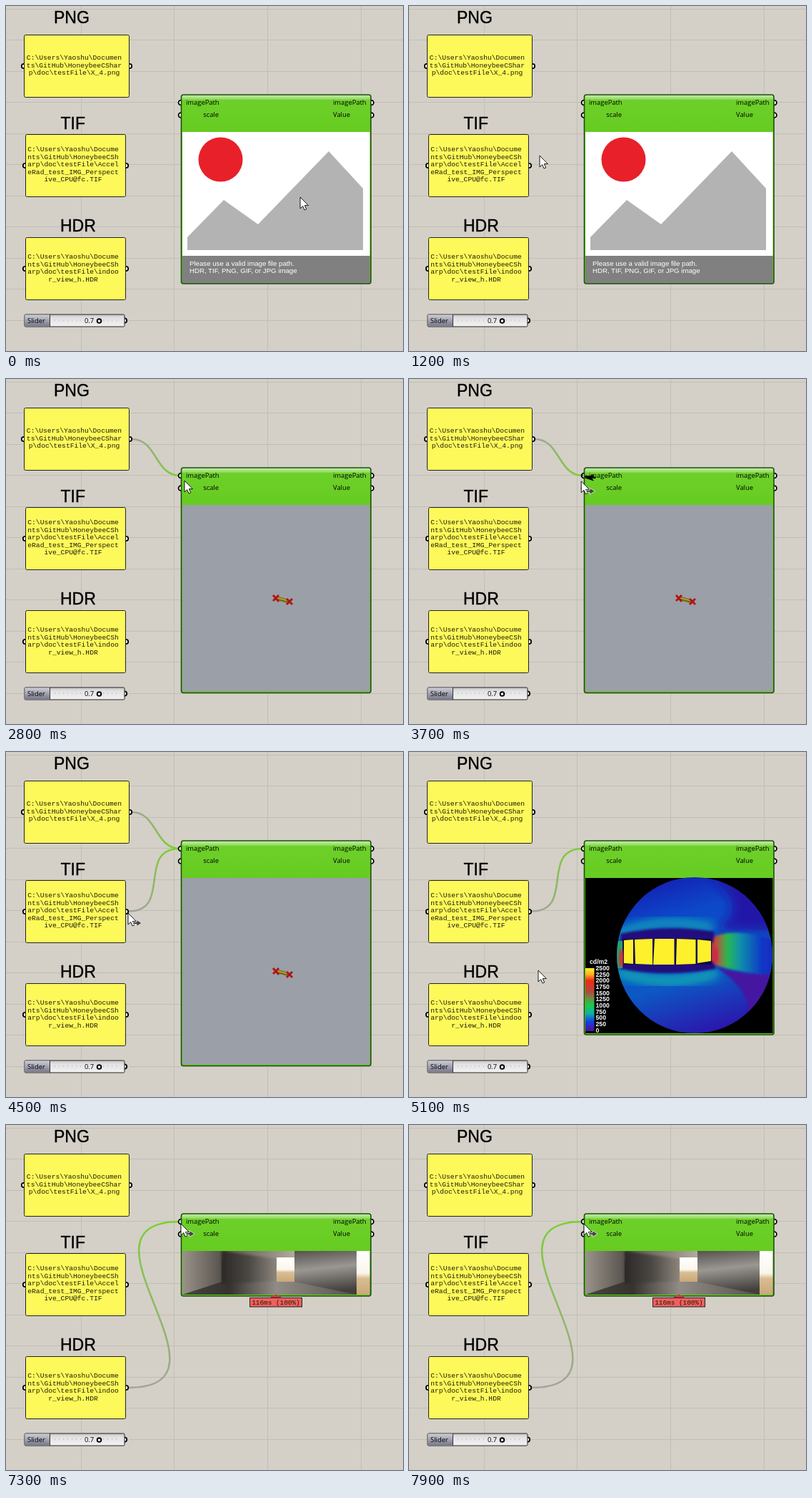
These frames come from a looping animation (556x482 px, 8000 ms). An HTML page:

```html
<!DOCTYPE html>
<html lang="en">
<head>
<meta charset="utf-8">
<title>Image viewer wiring</title>
<style>
  html, body { margin: 0; width: 100%; height: 100%; overflow: hidden; background: #d4d0c8; }
  svg { display: block; }
  text { white-space: pre; }
  .title { font: 23px "Liberation Sans", Arial, sans-serif; stroke: #000; stroke-width: .4; }
  .mono { font: 9.67px "Liberation Mono", "Courier New", monospace; fill: #1c1c08; text-anchor: middle; }
  .ui { font: 9.4px "Open Sans", "Noto Sans", sans-serif; }
  .note { font: 9.66px "Liberation Sans", Arial, sans-serif; fill: #fff; }
  .scale { font: bold 8.7px "Liberation Sans", Arial, sans-serif; fill: #fff; }
  .port { fill: #fff; stroke: #000; stroke-width: 1.8; }
  .wire { fill: none; stroke-width: 2.6; }
</style>
</head>
<body>
<svg width="556" height="482" viewBox="0 0 556 482">
  <defs>
    <linearGradient id="body" gradientUnits="userSpaceOnUse" x1="0" y1="124" x2="0" y2="176">
      <stop offset="0" stop-color="#c9eeb0"/><stop offset=".12" stop-color="#92dc60"/>
      <stop offset=".14" stop-color="#6dd02a"/><stop offset="1" stop-color="#66cc20"/>
    </linearGradient>
    <linearGradient id="knob" x2="0" y2="1">
      <stop offset="0" stop-color="#cdcdd6"/><stop offset="1" stop-color="#77778a"/>
    </linearGradient>
    <linearGradient id="track" x2="0" y2="1">
      <stop offset="0" stop-color="#c6c6c6"/><stop offset=".3" stop-color="#e2e2e2"/><stop offset="1" stop-color="#f2f2f2"/>
    </linearGradient>
    <linearGradient id="heat" x2="0" y2="1">
      <stop offset="0" stop-color="#fff02c"/><stop offset=".1" stop-color="#ffb020"/>
      <stop offset=".2" stop-color="#f02818"/><stop offset=".38" stop-color="#b04a40"/>
      <stop offset=".5" stop-color="#5c9a48"/><stop offset=".6" stop-color="#18cc50"/>
      <stop offset=".72" stop-color="#10b0a8"/><stop offset=".85" stop-color="#1440e0"/>
      <stop offset="1" stop-color="#5a0c9c"/>
    </linearGradient>
    <linearGradient id="dome" x1=".3" x2=".6" y2="1">
      <stop offset="0" stop-color="#1420b4"/><stop offset=".25" stop-color="#0c48c8"/>
      <stop offset=".65" stop-color="#0c58c4"/><stop offset="1" stop-color="#2c14ac"/>
    </linearGradient>
    <linearGradient id="glow">
      <stop offset="0" stop-color="#d82838"/><stop offset=".1" stop-color="#a86040"/>
      <stop offset=".25" stop-color="#28b850"/><stop offset=".45" stop-color="#1090a8"/>
      <stop offset=".8" stop-color="#1038c8"/><stop offset="1" stop-color="#1828b8"/>
    </linearGradient>
    <linearGradient id="wallL"><stop offset="0" stop-color="#9a938a"/><stop offset="1" stop-color="#58534d"/></linearGradient>
    <linearGradient id="wallB"><stop offset="0" stop-color="#2b2826"/><stop offset=".5" stop-color="#4c4844"/><stop offset="1" stop-color="#8c857c"/></linearGradient>
    <linearGradient id="roof"><stop offset="0" stop-color="#4e4a45"/><stop offset="1" stop-color="#b3aa9d"/></linearGradient>
    <linearGradient id="slab" x2=".15" y2="1"><stop offset="0" stop-color="#56524e"/><stop offset=".45" stop-color="#9a9691"/><stop offset="1" stop-color="#423f3c"/></linearGradient>
    <linearGradient id="floor"><stop offset="0" stop-color="#4a4642"/><stop offset=".25" stop-color="#35322f"/><stop offset=".5" stop-color="#918c85"/><stop offset="1" stop-color="#4c4844"/></linearGradient>
    <linearGradient id="sky" x2="0" y2="1">
      <stop offset="0" stop-color="#fff"/><stop offset=".5" stop-color="#fbf6ec"/>
      <stop offset=".62" stop-color="#d9bd92"/><stop offset="1" stop-color="#c8a878"/>
    </linearGradient>
    <filter id="soft" x="-30%" y="-50%" width="160%" height="200%"><feGaussianBlur stdDeviation="7"/></filter>
    <filter id="haze" x="-30%" y="-30%" width="160%" height="160%"><feGaussianBlur stdDeviation="1.5"/></filter>
    <clipPath id="lens"><circle cx="400" cy="284" r="109"/></clipPath>
    <clipPath id="strip"><rect x="247" y="176" width="262.5" height="61"/></clipPath>
  </defs>

  <g id="grid" stroke="#c1beb5"></g>
  <g id="wires"></g>
  <g id="panels"></g>

  <g id="slider">
    <circle class="port" cx="166" cy="439.5" r="3.2"/>
    <rect x="26" y="431" width="140" height="17" rx="1.5" fill="url(#track)" stroke="#222"/>
    <rect x="26.5" y="431.5" width="34.5" height="16" fill="url(#knob)"/>
    <path d="M61.5 431V448" stroke="#333"/>
    <path d="M68 439H106M136 439H160" stroke="#c4c4c4" stroke-width="2" stroke-dasharray="1 5"/>
    <text class="ui" x="30" y="443">Slider</text>
    <text class="ui" x="110" y="443">0.7</text>
    <circle cx="130.5" cy="440" r="2.8" fill="#fff" stroke="#000" stroke-width="1.9"/>
  </g>

  <g id="viewer">
    <g id="ports"></g>
    <rect id="shell" x="245.5" y="124" width="265.5" rx="3" fill="url(#body)" stroke="#1d4f0c" stroke-width="1.6"/>
    <text class="ui" x="252" y="138">imagePath</text>
    <text class="ui" x="298" y="155" text-anchor="end">scale</text>
    <text class="ui" x="458" y="138">imagePath</text>
    <text class="ui" x="458" y="155">Value</text>

    <g id="empty">
      <rect x="247" y="176" width="262.5" height="173" fill="#fff"/>
      <circle cx="300.5" cy="214.5" r="31" fill="#e8202a"/>
      <path d="M254 341V323L305 271L353 305L452 203L500 255V341Z" fill="#b3b3b3"/>
      <rect x="247" y="349" width="262.5" height="38" fill="#808080"/>
      <text class="note" x="257" y="362.5">Please use a valid image file path.</text>
      <text class="note" x="257" y="373">HDR, TIF, PNG, GIF, or JPG image</text>
    </g>

    <g id="png">
      <rect x="247" y="176" width="262.5" height="260.5" fill="#9b9fa8"/>
      <path d="M378 306L397 311" stroke="#6f6a1c" stroke-width="5"/>
      <path d="M380 306L396 310" stroke="#c8a830" stroke-width="1.5"/>
      <path d="M374 302L382 311M382 302L374 310M393 307L401 315M401 307L393 315" stroke="#b01414" stroke-width="2.8"/>
    </g>

    <g id="tif">
      <rect x="247" y="176" width="262.5" height="217" fill="#000"/>
      <g clip-path="url(#lens)">
        <rect x="290" y="174" width="220" height="220" fill="url(#dome)"/>
        <path d="M420 170L515 170V250L430 248Q480 220 420 170Z" fill="#2014a8" filter="url(#soft)"/>
        <path d="M288 256Q350 228 426 246" fill="none" stroke="#10a0b8" stroke-width="13" filter="url(#soft)"/>
        <path d="M290 306Q360 332 432 308" fill="none" stroke="#10a8b4" stroke-width="15" filter="url(#soft)"/>
        <path d="M424 260Q450 244 512 262V312Q460 308 424 296Z" fill="url(#glow)" filter="url(#haze)"/>
        <path d="M428 299Q460 311 512 311V360L470 380Q490 340 428 299Z" fill="#4412a0" filter="url(#haze)"/>
        <path d="M296 254Q360 240 428 251L426 266H297ZM296 292H426L430 303Q360 315 296 303Z" fill="#20107c" filter="url(#haze)"/>
        <rect x="299" y="261" width="125" height="36" fill="#120a48"/>
        <path d="M290 264H299V302H290Z" fill="#28a068"/>
        <ellipse cx="297" cy="288" rx="3" ry="13" fill="#d03438" filter="url(#haze)"/>
        <path d="M301 263L314 262V296L301 295ZM316 262L341 261V297L317 296ZM344 261H371.500V297H342ZM375 261L401.500 262V296L374 297ZM404 262L423 264V292L404 295Z" fill="#fff02c"/>
        <ellipse cx="429" cy="284" rx="4" ry="12" fill="#d02c44" filter="url(#haze)"/>
      </g>
      <text class="scale" x="253" y="296">cd/m2</text>
      <rect x="247" y="302" width="12.500" height="88" fill="url(#heat)"/>
      <g id="ticks"></g>
    </g>

    <g id="hdr">
      <g clip-path="url(#strip)">
        <rect x="247" y="176" width="263" height="62" fill="url(#floor)"/>
        <path d="M300 176H404V186L379 188L302 190Z" fill="url(#roof)"/>
        <path d="M247 176H302V219L247 237Z" fill="url(#wallL)"/>
        <path d="M302 176L379 187V218L302 222Z" fill="url(#wallB)" filter="url(#haze)"/>
        <rect x="379" y="185" width="26" height="34" fill="url(#sky)"/>
        <path d="M404 176H491V237L404 219Z" fill="url(#slab)"/>
        <rect x="491" y="176" width="19" height="62" fill="url(#sky)"/>
      </g>
      <path d="M369 241.500L378 236.500L387 241.500Z" fill="#c83c40"/>
      <rect x="341.500" y="241.500" width="73" height="12.500" fill="#f0605f" stroke="#222"/>
      <text class="mono" x="378" y="251" style="font-size:9.4px">116ms (100%)</text>
    </g>
  </g>

  <g id="drag">
    <path id="dash" fill="none" stroke="#000" stroke-width="2.6" stroke-dasharray="6 3"/>
    <path id="head" d="M0 0L-14 -4.500L-11 0L-14 4.500Z"/>
  </g>
  <g id="cursor">
    <path d="M0 0V16L3.700 12.600L6.100 18L8.700 16.900L6.300 11.600H11.300Z" fill="#fff" stroke="#000" stroke-width=".9"/>
    <path id="badge" d="M7 12.500H12V9.500L19 14L12 18.500V15.500H7Z" fill="#444" stroke="#eee" stroke-width=".8"/>
  </g>
</svg>

<script>
const LOOP = 8000, STEP = 100;
const $ = id => document.getElementById(id);

function add(parent, tag, attrs, text = "") {
  const el = document.createElementNS("http://www.w3.org/2000/svg", tag);
  for (const key in attrs) el.setAttribute(key, attrs[key]);
  el.textContent = text;
  parent.append(el);
  return el;
}

// Background grid
for (let i = 0; i < 4; i++) {
  const x = Math.round(104.5 + i * 130.7) + .5;
  add($("grid"), "path", { d: `M${x} 0V482` });
}
for (let i = 0; i < 11; i++) {
  const y = Math.round(3.5 + i * 43.55) + .5;
  add($("grid"), "path", { d: `M0 ${y}H556` });
}

// Text panels
const panels = [
  { title: "PNG", tx: 67, ty: 24, x: 25.5, y: 40.5, w: 147, cx: 95.5, base: 75,
    lines: ["C:\\Users\\Yaoshu\\Documen", "ts\\GitHub\\HoneybeeCShar", "p\\doc\\testFile\\X_4.png"] },
  { title: "TIF", tx: 76.5, ty: 172, x: 27.5, y: 179.5, w: 140, cx: 94, base: 203,
    lines: ["C:\\Users\\Yaoshu\\Docume", "nts\\GitHub\\HoneybeeCSh", "arp\\doc\\testFile\\Accel",
      "eRad_test_IMG_Perspect", "ive_CPU@fc.TIF"] },
  { title: "HDR", tx: 76, ty: 314.5, x: 27.5, y: 323.5, w: 140, cx: 94, base: 353,
    lines: ["C:\\Users\\Yaoshu\\Docume", "nts\\GitHub\\HoneybeeCSh", "arp\\doc\\testFile\\indoo", "r_view_h.HDR"] }
];
for (const p of panels) {
  const g = $("panels"), cy = p.y + 43.5;
  add(g, "text", { class: "title", x: p.tx, y: p.ty }, p.title);
  for (const cx of [p.x - .5, p.x + p.w + .5]) add(g, "circle", { class: "port", cx, cy, r: 3.2 });
  add(g, "rect", { x: p.x, y: p.y, width: p.w, height: 87, rx: 2, fill: "#fef95a", stroke: "#222" });
  p.lines.forEach((line, i) => add(g, "text", { class: "mono", x: p.cx, y: p.base + i * 10.6 }, line));
}

for (const cx of [245, 511.5])
  for (const cy of [135, 152.5]) add($("ports"), "circle", { class: "port", cx, cy, r: 3.4 });

for (let i = 0; i <= 10; i++)
  add($("ticks"), "text", { class: "scale", x: 261.5, y: 305 + i * 8.65 }, 2500 - i * 250);

// Wires leave and arrive horizontally
const inlet = [244, 135];
function curve([x0, y0], [x1, y1]) {
  const d = Math.max(.71 * Math.abs(y1 - y0), Math.abs(x1 - x0) / 2);
  return `M${x0} ${y0}C${x0 + d} ${y0} ${x1 - d} ${y1} ${x1} ${y1}`;
}

const links = [
  { from: [176, 84], on: 2600, off: 4700 },
  { from: [171.5, 222.5], on: 4400, off: 7100 },
  { from: [171.5, 367], on: 6700, off: LOOP }
];
links.forEach((link, i) => {
  const [x1, y1] = link.from, [x2, y2] = inlet;
  const grad = add($("wires"), "linearGradient", { id: "tint" + i, gradientUnits: "userSpaceOnUse", x1, y1, x2, y2 });
  add(grad, "stop", { offset: 0, "stop-color": "#a5a29c" });
  add(grad, "stop", { offset: 1, "stop-color": "#78d228" });
  link.el = add($("wires"), "path", { class: "wire", d: curve(link.from, inlet), stroke: `url(#tint${i})` });
});

const drags = [
  { on: 1900, off: 2600, drop: 2800, from: links[0].from },
  { on: 3500, off: 4400, drop: 4700, from: inlet, back: true },
  { on: 6200, off: 6700, drop: LOOP, from: links[2].from }
];

const views = [
  { id: "empty", on: 0, bottom: 388 },
  { id: "png", on: 2800, bottom: 438.5 },
  { id: "tif", on: 4700, bottom: 395 },
  { id: "hdr", on: 7100, bottom: 239 }
];

// Pointer stops: time, x, y
const stops = [
  [0, 412, 267], [300, 412, 267], [1000, 184, 211], [1100, 184, 211], [1200, 183, 209],
  [1700, 174, 86], [1800, 174, 86], [2600, 247, 140], [2700, 247, 140], [2800, 250, 142],
  [3400, 250, 142], [3600, 245, 138], [4300, 177, 224], [4500, 171, 225], [4600, 171, 225],
  [5000, 181, 303], [5100, 181, 305], [5300, 182, 307], [5400, 182, 307], [5900, 169, 368],
  [6100, 169, 368], [6500, 268, 112], [6600, 256, 118], [6700, 246, 136], [6800, 246, 136],
  [6900, 245, 138], [LOOP, 245, 138]
];
function pointer(t) {
  const i = stops.findIndex(s => s[0] > t);
  const [t0, x0, y0] = stops[i - 1], [t1, x1, y1] = stops[i];
  const u = (t - t0) / (t1 - t0), e = u * u * (3 - 2 * u);
  return [x0 + (x1 - x0) * e, y0 + (y1 - y0) * e];
}

const show = (el, on) => el.style.display = on ? "" : "none";
const within = (t, a, b) => t >= a && t < b;

function render(t) {
  const view = views.findLast(v => t >= v.on);
  for (const v of views) show($(v.id), v === view);
  $("shell").setAttribute("height", view.bottom - 124);

  for (const link of links) show(link.el, within(t, link.on, link.off));

  const drag = drags.find(d => within(t, d.on, d.drop));
  const loose = drag && t < drag.off;
  show($("badge"), drag);
  show($("drag"), loose);
  if (loose) {
    // The loose end trails the pointer by one step
    const [x, y] = pointer(t - STEP), dir = drag.back ? -1 : 1;
    const end = [x - 14 * dir, y];
    $("dash").setAttribute("d", drag.back ? curve(end, drag.from) : curve(drag.from, end));
    $("head").setAttribute("transform", `translate(${x} ${y}) scale(${dir} 1)`);
  }

  const [x, y] = pointer(t);
  $("cursor").setAttribute("transform", `translate(${x} ${y})`);
}

const start = performance.now();
function tick() {
  const t = (performance.now() - start) % LOOP;
  render(Math.floor(t / STEP) * STEP);
  requestAnimationFrame(tick);
}
tick();
</script>
</body>
</html>
```
